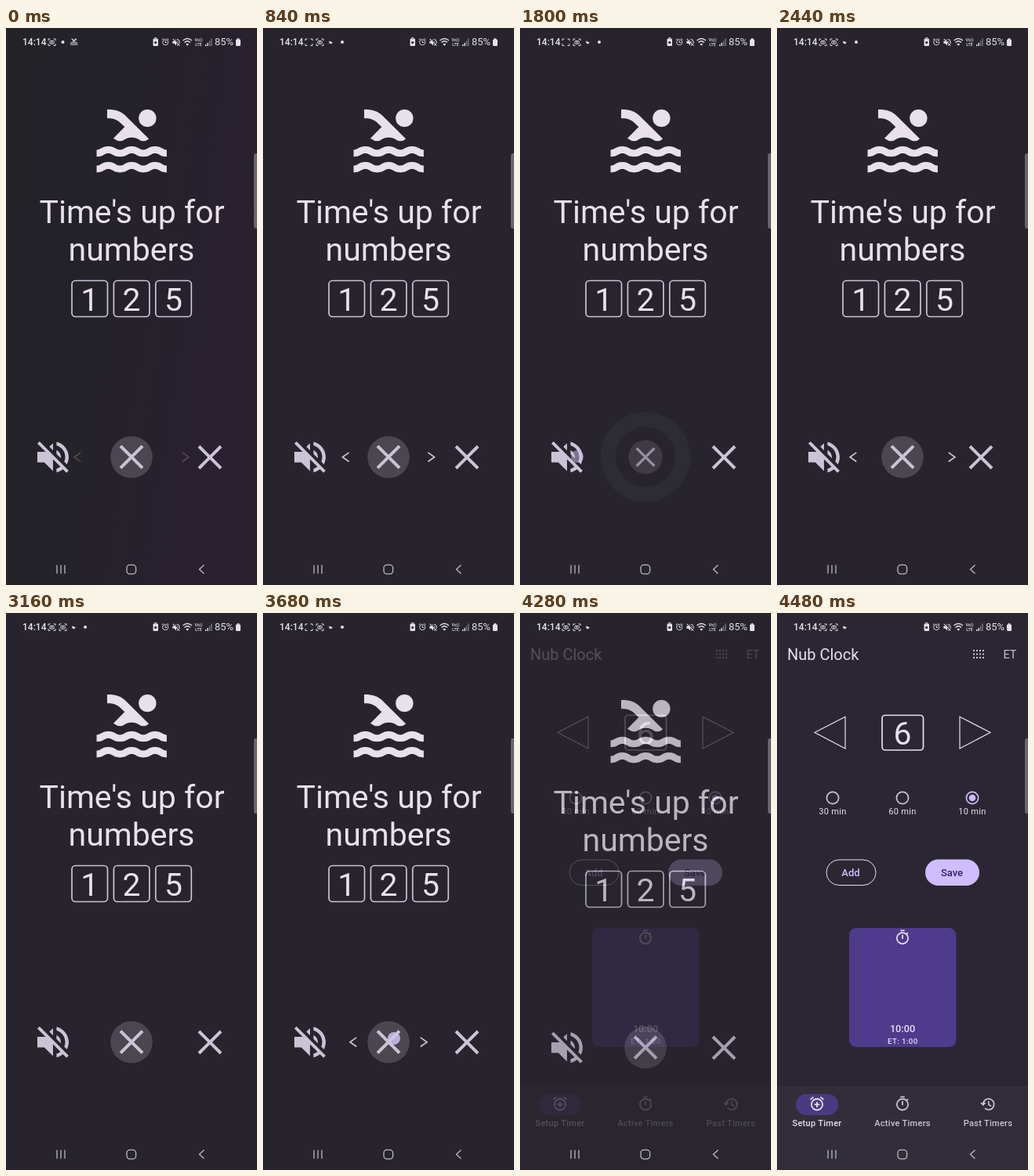
An HTML page for the animation above (4520 ms loop, 320 by 711 pixels).

```html
<!DOCTYPE html>
<html lang="en">
<head>
<meta charset="utf-8">
<title>Timer alarm</title>
<style>
  html, body { margin: 0; width: 100%; height: 100%; overflow: hidden; background: #27242d; }
  svg { display: block; width: 100%; height: 100%; font-family: Roboto, sans-serif; }
  .mid { text-anchor: middle; }
  .line { fill: none; stroke: currentColor; }
  .big { font-size: 41px; }
  .label { font-size: 11px; letter-spacing: .3px; }
  .strong { font-weight: 500; }
</style>
</head>
<body>
<svg viewBox="0 0 320 711" preserveAspectRatio="none">
  <defs>
    <linearGradient id="dusk" x2="1" y2=".35">
      <stop offset="0" stop-color="#232328"/>
      <stop offset=".55" stop-color="#25222a"/>
      <stop offset="1" stop-color="#2a2030"/>
    </linearGradient>
    <path id="wave" d="M22 21c-1.11 0-1.73-.37-2.18-.64-.37-.22-.6-.36-1.15-.36-.56 0-.78.13-1.15.36-.46.27-1.07.64-2.18.64s-1.73-.37-2.18-.64c-.37-.22-.6-.36-1.15-.36-.56 0-.78.13-1.15.36-.46.27-1.08.64-2.19.64-1.11 0-1.73-.37-2.18-.64-.37-.23-.6-.36-1.15-.36s-.78.13-1.15.36c-.46.27-1.08.64-2.19.64v-2c.56 0 .78-.13 1.15-.36.45-.27 1.07-.64 2.18-.64s1.73.37 2.18.64c.37.23.59.36 1.15.36.56 0 .78-.13 1.15-.36.45-.27 1.07-.64 2.18-.64 1.11 0 1.73.37 2.18.64.37.22.6.36 1.15.36s.78-.13 1.15-.36c.45-.27 1.07-.64 2.18-.64s1.73.37 2.18.64c.37.23.59.36 1.15.36z"/>
    <g id="swimmer">
      <use href="#wave"/><use href="#wave" y="-4.5"/>
      <path d="M8.67 12c.56 0 .78-.13 1.15-.36.46-.27 1.08-.64 2.19-.64 1.11 0 1.73.37 2.18.64.37.22.6.36 1.15.36s.78-.13 1.15-.36c.12-.07.26-.15.41-.23L10.48 5C8.93 3.45 7.5 2.99 5 3v2.5c1.82-.01 2.89.39 4 1.5l1 1-3.25 3.25c.31.12.56.27.77.39.37.23.59.36 1.15.36z"/>
      <circle cx="16.5" cy="5.5" r="2.5"/>
    </g>
    <path id="mute" d="M16.5 12c0-1.77-1.02-3.29-2.5-4.03v2.21l2.45 2.45c.03-.2.05-.41.05-.63zm2.5 0c0 .94-.2 1.82-.54 2.64l1.51 1.51C20.63 14.91 21 13.5 21 12c0-4.28-2.99-7.86-7-8.77v2.06c2.89.86 5 3.54 5 6.71zM4.27 3L3 4.27 7.73 9H3v6h4l5 5v-6.73l4.25 4.25c-.67.52-1.42.93-2.25 1.18v2.06c1.38-.31 2.63-.95 3.69-1.81L19.73 21 21 19.73l-9-9L4.27 3zM12 4L9.91 6.09 12 8.18V4z"/>
    <path id="cross" class="line" stroke-width="4" d="M-14-14L14 14M14-14L-14 14"/>
    <path id="brackets" class="line" d="M-4.5-2V-4.2H-2M2-4.2H4.5V-2M4.5 2V4.2H2M-2 4.2H-4.5V2"/>
    <g id="lens" class="line"><rect x="-2.6" y="-1.8" width="5.2" height="3.8" rx="1"/><circle r=".7"/></g>
    <g id="stopwatch" class="line" stroke-width="2">
      <circle cx="12" cy="13" r="8"/>
      <path d="M9 2H15M12 8V14M18 7L19.8 5.2"/>
    </g>
    <g id="alarm" class="line" stroke-width="2">
      <circle cx="12" cy="13" r="8"/><path d="M2.5 6L7 2.3M17 2.3L21.5 6"/>
    </g>
  </defs>

  <rect width="320" height="711" fill="#27242d"/>
  <rect id="tint" width="320" height="711" fill="url(#dusk)"/>

  <g id="ringing" color="#cbc4d6" fill="#e8e1e9">
    <use href="#swimmer" transform="translate(106.6 90.6) scale(4.47)"/>
    <g class="big mid">
      <text x="160.5" y="249">Time's up for</text>
      <text x="160" y="297">numbers</text>
      <g id="numbers"></g>
    </g>
    <use href="#mute" transform="translate(33.3 521.1) scale(2.22)" fill="#cbc4d6"/>
    <use href="#cross" transform="translate(260 548)"/>
    <circle id="targetGlow" cx="260" cy="548" r="34" fill="#cbc4d6"/>
    <circle id="pulse" cx="160" cy="547.5" class="line" stroke="#d8d0e4"/>
    <g id="button">
      <circle r="26.8" fill="#4a4750"/>
      <use href="#cross"/>
    </g>
    <g id="arrows" class="line" stroke-width="1.7">
      <path id="leftArrow" d="M4.2-5.8L-4 0L4.2 5.8"/>
      <path id="rightArrow" d="M-4.2-5.8L4 0L-4.2 5.8"/>
    </g>
    <circle id="touch" r="8" fill="#cdc3ee"/>
  </g>

  <g id="setup" color="#e6e0ec" fill="#e6e0ec">
    <rect width="320" height="711" fill="#2b2732"/>
    <rect y="604" width="320" height="107" fill="#322e39"/>
    <text x="13" y="59.5" font-size="20">Nub Clock</text>
    <path class="line" color="#cac4d0" stroke-width="2" stroke-dasharray="2 2" d="M250 48H264M250 52.5H264M250 57H264"/>
    <text x="297" y="57.5" font-size="14.5" class="mid" fill="#cac4d0">ET</text>
    <path class="line" stroke-width="1.2" d="M48 152.5L87 132.5V173ZM272 152.5L233 132.5V173Z"/>
    <rect class="line" stroke-width="1.7" x="134" y="130.5" width="52.5" height="44.5" rx="4"/>
    <text x="160" y="167.5" class="big mid">6</text>
    <g id="radios"></g>
    <rect class="line" stroke="#938f99" x="63" y="315" width="63" height="32.5" rx="16.2"/>
    <rect x="189" y="314.5" width="69" height="33.5" rx="16.7" fill="#cfbcff"/>
    <g class="mid strong" font-size="13">
      <text x="94" y="335.5" fill="#cfbcff">Add</text>
      <text x="223" y="335.5" fill="#381e72">Save</text>
    </g>
    <rect x="92" y="402" width="136.5" height="152" rx="9" fill="#4f3b8c"/>
    <use href="#stopwatch" transform="translate(149.3 403.6) scale(.89)"/>
    <g class="mid strong">
      <text x="160" y="534.5" font-size="12.7">10:00</text>
      <text x="160.3" y="550" font-size="9.7" letter-spacing=".4">ET: 1:00</text>
    </g>
    <rect x="24" y="614" width="54" height="27" rx="13.5" fill="#4a3a82"/>
    <use href="#alarm" transform="translate(40.3 615.8) scale(.89)"/>
    <path class="line" stroke-width="1.8" d="M47.5 627.4H54.5M51 623.9V630.9"/>
    <use href="#stopwatch" transform="translate(149.3 615.8) scale(.89)" color="#cac4d0"/>
    <path class="line" color="#cac4d0" stroke-width="1.7" d="M262.8 627A7 7 0 1 1 265 632.2M260 625L262.8 628L265.6 625M269.8 623V627.5L273 629.5"/>
    <g class="label mid strong">
      <text x="51" y="655">Setup Timer</text>
      <g fill="#cac4d0"><text x="160" y="655">Active Timers</text><text x="269" y="655">Past Timers</text></g>
    </g>
  </g>

  <g id="statusBar" color="#e4e1e7" fill="#e4e1e7">
    <text x="21" y="22.3" font-size="12" class="strong">14:14</text>
    <use href="#brackets" x="58.5" y="18.2"/>
    <use id="recLens" href="#lens" x="58.5" y="18.2"/>
    <g id="earlyIcons">
      <circle cx="72.5" cy="18" r="2"/>
      <use href="#swimmer" transform="translate(81 12) scale(.47)"/>
    </g>
    <g id="lateIcons">
      <use href="#brackets" x="72.5" y="18.2"/><use href="#lens" x="72.5" y="18.2"/>
      <path d="M84 16.5L88.8 18.2L87 20.5L84.5 19.5Z"/>
      <circle id="moreDot" cx="101" cy="18" r="2"/>
    </g>
    <rect x="187.5" y="13.5" width="6.5" height="9.5" rx="1.3"/>
    <path d="M189.3 12.6H192.2" class="line"/>
    <circle cx="190.7" cy="18.5" r="1.6" fill="#27242d"/>
    <use href="#alarm" transform="translate(197.8 12.3) scale(.45)" stroke-width="3"/>
    <path class="line" d="M203.2 16V18.5H205"/>
    <use href="#mute" transform="translate(210.8 12) scale(.52)"/>
    <g class="line" stroke-width="1.3">
      <path d="M225.5 16Q231.3 11 237 16M227.5 18.5Q231.3 15 235 18.5"/>
    </g>
    <path d="M229.2 20.5Q231.3 18.8 233.3 20.5L231.3 22.8Z"/>
    <g class="mid strong" font-size="5.3"><text x="245.5" y="17.3">Vo))</text><text x="245.5" y="23">LTE</text></g>
    <path d="M254 21H255.4V23H254ZM256.4 19H257.8V23H256.4Z"/>
    <path d="M258.8 16.5H260.2V23H258.8ZM261.2 13.5H262.6V23H261.2Z" opacity=".45"/>
    <text x="266" y="22.4" font-size="13">85%</text>
    <rect x="293" y="14.5" width="6" height="8.5" rx="1.2"/><rect x="294.7" y="13.2" width="2.6" height="2"/>
  </g>

  <path d="M320 160H318.5Q316 160 316 163V253Q316 256 318.5 256H320Z" fill="#69666e"/>
  <g class="line" color="#bbb8bf" stroke-width="1.3">
    <path d="M65 685.5V696.5M70 685.5V696.5M75 685.5V696.5M252.5 685.5L246.5 691L252.5 696.5"/>
    <rect x="154" y="685.3" width="11.6" height="11.6" rx="3.8"/>
  </g>
</svg>

<script>
const LOOP = 4520, ARROW_CYCLE = 1472, SECOND_DRAG = 2120;
const el = id => document.getElementById(id);
const clamp = v => Math.min(1, Math.max(0, v));
const ramp = (t, from, to) => clamp((t - from) / (to - from));
const mix = (a, b, k) => a + (b - a) * k;
const smooth = k => k * k * (3 - 2 * k);
const fade = (id, value) => el(id).setAttribute('opacity', value.toFixed(3));
const place = (id, x, y, scale = 1) =>
  el(id).setAttribute('transform', `translate(${x.toFixed(2)} ${y.toFixed(2)}) scale(${scale.toFixed(3)})`);

// cubic-bezier(.4, 0, .2, 1), solved for x by bisection
function fastOutSlowIn(x) {
  let lo = 0, hi = 1;
  for (let i = 0; i < 18; i++) {
    const s = (lo + hi) / 2;
    const bx = 1.2 * s * (1 - s) ** 2 + .6 * s * s * (1 - s) + s ** 3;
    if (bx < x) lo = s; else hi = s;
  }
  return 3 * lo * lo - 2 * lo ** 3;
}

el('numbers').innerHTML = [1, 2, 5].map((n, i) => {
  const x = 106.7 + i * 53.4;
  return `<rect class="line" stroke-width="1.7" x="${x - 22.7}" y="322.5" width="45.5" height="46" rx="4.5"/>
    <text x="${x}" y="360.5">${n}</text>`;
}).join('');

el('radios').innerHTML = ['30 min', '60 min', '10 min'].map((text, i) => {
  const x = 71 + i * 89, on = i === 2;
  return `<g color="${on ? '#cfbcff' : '#cac4d0'}"><circle class="line" stroke-width="1.7" cx="${x}" cy="236" r="7.6"/>
    ${on ? `<circle cx="${x}" cy="236" r="4.3" fill="currentColor"/>` : ''}</g>
    <text class="label mid" x="${x}" y="257">${text}</text>`;
}).join('');

function drawArrows(t) {
  const u = (t - 376 + ARROW_CYCLE) % ARROW_CYCLE;
  const x = mix(120, 91, fastOutSlowIn(ramp(u, 184, 984)));
  const dragging = (t > 1640 && t < 2140) || t > 3740;
  place('leftArrow', x, 547.7);
  place('rightArrow', 320 - x, 547.7);
  fade('arrows', dragging ? 0 : ramp(u, 0, 184) * (1 - ramp(u, 960, 1140)));
}

function drawDrag(t) {
  const second = t > 3000;
  const d = second ? t - SECOND_DRAG : t;
  const press = smooth(ramp(d, 1600, 1760)) * (1 - smooth(ramp(d, 1860, 2000)));
  place('button', 160, 547.7, mix(1, .81, press));
  fade('button', mix(1, .68, press));

  const grow = ramp(d, 1640, 1960);
  el('pulse').setAttribute('r', mix(27, 68, grow));
  el('pulse').setAttribute('stroke-width', 19);
  fade('pulse', grow > 0 && grow < 1 ? .076 * (1 - grow) : 0);

  const [start, arrive, lift] = second ? [3660, 3860, 3980] : [1620, 1770, 1960];
  const k = smooth(ramp(t, start + 20, arrive));
  place('touch', mix(second ? 167 : 162, second ? 260 : 73, k), mix(543, 547, k));
  fade('touch', t >= start && t < lift ? mix(.85, .5, k) : 0);
  fade('targetGlow', .16 * ramp(t, 3780, 3840) * (1 - ramp(t, 3880, 4040)));
}

function drawStatus(t) {
  const early = t < 160;
  fade('earlyIcons', early ? 1 : 0);
  fade('lateIcons', early ? 0 : 1);
  fade('recLens', early || Math.floor((t - 160) / 500) % 2 === 0 ? 1 : 0);
  fade('moreDot', t < 4100 ? 1 : 0);
}

function draw(t) {
  fade('tint', 1 - ramp(t, 40, 520));
  drawArrows(t);
  drawDrag(t);
  drawStatus(t);
  place('ringing', 0, 7 * smooth(ramp(t, 4060, 4160)));
  fade('setup', smooth(ramp(t, 4200, 4460)));
}

const begin = performance.now();
function tick() {
  draw((performance.now() - begin) % LOOP);
  requestAnimationFrame(tick);
}
tick();
</script>
</body>
</html>
```
